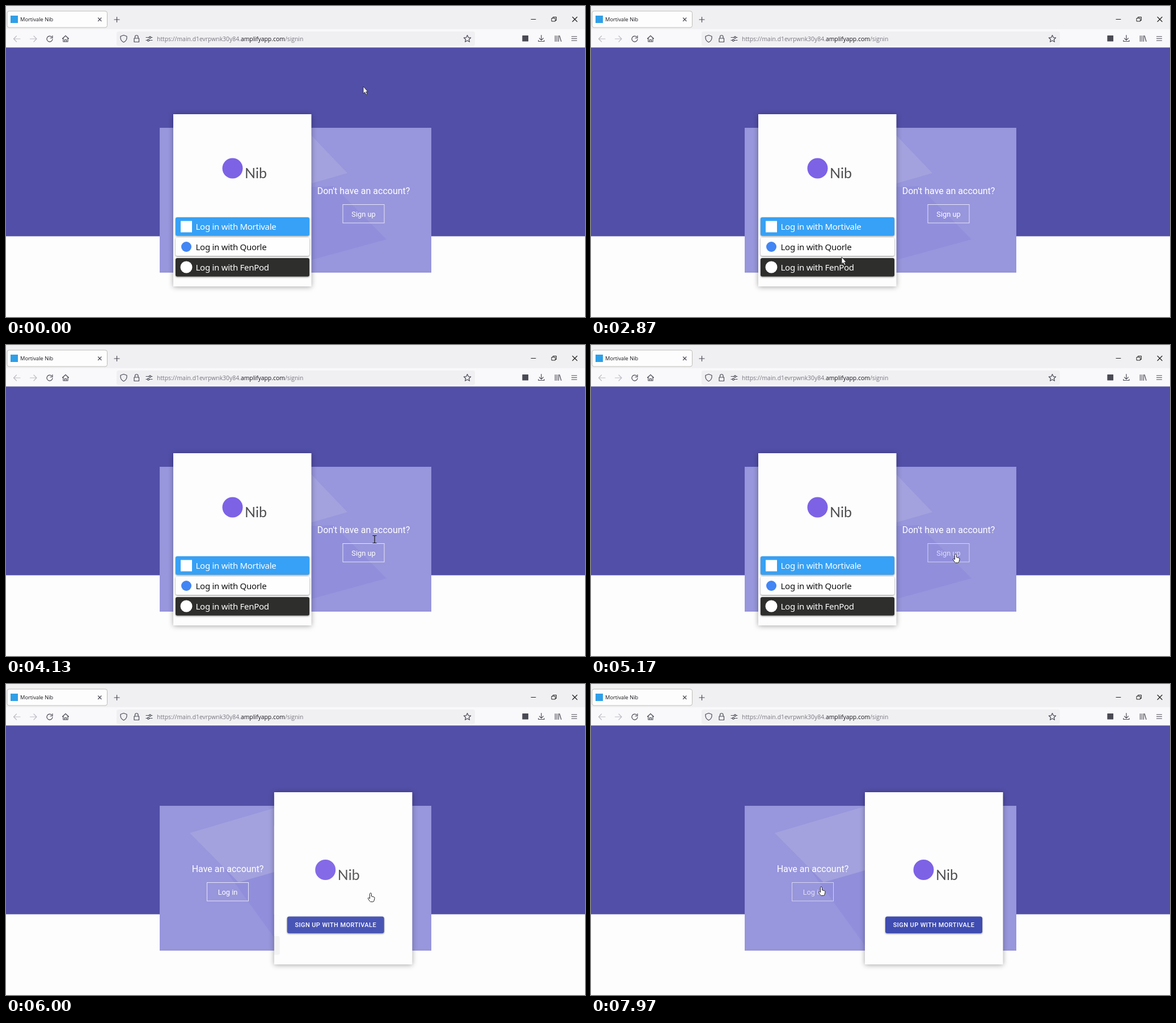
An HTML page for the animation above (8 s loop, 1021 by 549 pixels).

```html
<!DOCTYPE html>
<html lang="en">
<head>
<meta charset="utf-8">
<title>Sign in</title>
<style>
html, body { margin: 0; width: 100%; height: 100%; overflow: hidden; background: #fdfdfd; }
svg { display: block; width: 100vw; height: 100vh; }
.ui { font-family: "Open Sans", sans-serif; }
.heading { font: 16px Roboto, sans-serif; fill: #fff; text-anchor: middle; }
.outline text { font: 12.8px Roboto, sans-serif; fill: #fff; text-anchor: middle; }
.outline rect { fill: none; stroke: #e6e5f8; }
.outline.hover text { opacity: .7; }
.outline.hover rect { opacity: .8; }
.login text { font: 15px "Noto Sans", sans-serif; letter-spacing: -.28px; fill: #fff; }
.raised { filter: drop-shadow(0 1px 1.5px rgba(0, 0, 0, .45)); }
.icons { fill: none; stroke: #4a4a55; stroke-width: 1.2; stroke-linecap: round; stroke-linejoin: round; }
#sheet { filter: drop-shadow(0 1px 5px rgba(0, 0, 0, .35)); }
</style>
</head>
<body>
<svg viewBox="0 0 1021 549" xmlns="http://www.w3.org/2000/svg">
  <defs>
    <clipPath id="panelClip"><rect x="271" y="215" width="479" height="255.5"/></clipPath>
    <clipPath id="cardClip"><rect y="191" width="243.5" height="304"/></clipPath>
    <g id="logo">
      <circle cx="104.5" cy="286.5" r="18" fill="#7d62e6"/>
      <text x="126" y="304" font-family="Lato, sans-serif" font-size="25" fill="#4d4d50">Nib</text>
    </g>
  </defs>

  <!-- page -->
  <rect width="1021" height="549" fill="#fdfdfd"/>
  <rect y="73" width="1021" height="333.5" fill="#524fa8"/>
  <g clip-path="url(#panelClip)">
    <rect x="271" y="215" width="479" height="256" fill="#9896dc"/>
    <path d="M385 326L484 463L671 412L578 318Z" fill="#918fdb"/>
    <path d="M324 263L517 206L602 295L410 350Z" fill="#a3a2de"/>
    <path d="M271 470H750" stroke="#8583c4"/>
  </g>
  <text class="heading" x="391" y="332">Have an account?</text>
  <text class="heading" x="630.5" y="332">Don't have an account?</text>
  <g class="outline" id="toLogin"><rect x="354.5" y="350.5" width="73" height="32.5"/><text x="391" y="371.5">Log in</text></g>
  <g class="outline" id="toSignup"><rect x="594" y="350.5" width="73" height="32.5"/><text x="630.5" y="371.5">Sign up</text></g>

  <!-- sliding card -->
  <g id="card">
    <rect id="sheet" y="191" width="243.5" height="304" fill="#fdfdfd"/>
    <g clip-path="url(#cardClip)">
      <g id="login" class="login">
        <use href="#logo"/>
        <rect class="raised" x="4" y="373" width="236" height="32.5" rx="3" fill="#36a1f6"/>
        <rect class="raised" x="4" y="409" width="236" height="32" rx="3" fill="#fefefe"/>
        <rect class="raised" x="4" y="445" width="236" height="32.5" rx="3" fill="#2e2e2d"/>
        <rect x="13" y="379.5" width="20" height="20" fill="#fff"/>
        <circle cx="23" cy="425" r="9" fill="#4285f4"/>
        <circle cx="23" cy="461" r="10.5" fill="#fff"/>
        <text x="39.5" y="395">Log in with Mortivale</text>
        <text x="39.5" y="431" style="fill:#111">Log in with Quorle</text>
        <text x="39.5" y="467">Log in with FenPod</text>
      </g>
      <g id="signup">
        <rect x="9" y="250" width="225" height="157" fill="#fdfdfd"/>
        <use href="#logo" x="-1" y="41.5"/>
        <rect class="raised" x="36" y="410.5" width="171" height="29.5" rx="3.5" fill="#3f4cb1"/>
        <text x="121.5" y="429" text-anchor="middle" font-family="Roboto, sans-serif" font-weight="500" font-size="11" letter-spacing=".42" fill="#fff">SIGN UP WITH MORTIVALE</text>
      </g>
    </g>
  </g>

  <!-- browser window -->
  <rect width="1021" height="41" fill="#f0f0f2"/>
  <rect y="41" width="1021" height="32" fill="#f9f9fb"/>
  <path d="M0 73H1021" stroke="#d2d2da" stroke-width=".8"/>
  <rect x="2" y="9" width="176.5" height="29" rx="3.5" fill="#fdfdfd" stroke="#bdbdb8"/>
  <rect x="195" y="45" width="632" height="25.5" rx="3.5" fill="#f0f0f3"/>
  <rect x="8" y="17" width="13" height="13" fill="#2f9fe8"/>
  <g class="ui">
    <text x="25" y="27" font-size="9.3" fill="#15141a">Mortivale Nib</text>
    <text x="266" y="61.8" font-size="10.4" fill="#77777f">https://main.d1evrpwnk30y84.<tspan fill="#15141a">amplifyapp.com</tspan>/signin</text>
  </g>
  <g class="icons">
    <path stroke="#bcbcc3" d="M25 58H13.5M18.5 53L13.5 58L18.5 63M42.500 58H54M49 53L54 58L49 63"/>
    <path d="M80.500 54.500A5 5 0 1 0 82 58.500M82 52.500V56.500H78"/>
    <path d="M99.500 57.500L105 52.500L110.500 57.500M101 56.500V63H109V56.500M103.500 63V59.500H106.500V63"/>
    <path d="M207.500 51.500L213 53.500V57Q212.500 61.500 207.500 64Q202.500 61.500 202 57V53.500Z"/>
    <path d="M226 57H234.500V63.500H226ZM227.500 57V54.500A2.700 2.700 0 0 1 233 54.500V57"/>
    <path d="M247 55.500H252M256 55.500H258M247 60.500H249M253 60.500H258"/>
    <circle cx="254" cy="55.500" r="1.600"/><circle cx="251" cy="60.500" r="1.600"/>
    <path d="M813.500 51.500L815.300 55.600L819.700 56L816.400 59L817.400 63.300L813.500 61L809.600 63.300L810.600 59L807.300 56L811.700 55.600Z"/>
    <rect x="911" y="52.500" width="9.500" height="9.500" fill="#4a4a55"/>
    <path d="M944 51.500V60M940.500 56.800L944 60.300L947.500 56.800M939 60.500V62.500H949V60.500"/>
    <path d="M968.500 52.500V62.500M971.500 52.500V62.500M974.500 52.500V62.500M976 52.500L979 62.500"/>
    <path d="M997.500 54H1006.500M997.500 57.500H1006.500M997.500 61H1006.500"/>
    <path d="M191 24H200M195.500 19.500V28.500M162.500 21L168 26.500M168 21L162.500 26.500"/>
    <g stroke="#222">
      <path stroke-width="1" d="M926 23.500H934M962.500 21.500H968.500V27H962.500ZM964.500 21V19.500H970.500V25.500H969"/>
      <path d="M999 19.500L1007 27.500M1007 19.500L999 27.500"/>
    </g>
  </g>

  <!-- pointer -->
  <g id="cursor" stroke-linejoin="round">
    <path id="arrow" d="M0 0V12.500L2.700 10L4.900 14.500L6.900 13.500L4.800 9.300H8.200Z" fill="#fff" stroke="#222" stroke-width=".9"/>
    <path id="beam" d="M-3.500 -6.500H-1Q0 -6.500 0 -5.500Q0 -6.500 1 -6.500H3.500M0 -5.500V5.500M-3.500 6.500H-1Q0 6.500 0 5.500Q0 6.500 1 6.500H3.500" fill="none" stroke="#161616" stroke-width="1.2"/>
    <path id="hand" d="M-1.500 1.500A1.500 1.500 0 0 1 1.500 1.500V5.800L5.500 6.800Q7.400 7.300 7 9.300L6 13.500Q5.500 15.500 3.700 15.500H.3Q-.8 15.500 -1.500 14.500L-4.600 9.800Q-5 8.200 -3.300 8.300L-1.500 9.800Z" fill="#fff" stroke="#222" stroke-width="1"/>
  </g>
</svg>
<script>
const LOOP = 8000;
const el = id => document.getElementById(id);
const ease = (t, a, b) => {
  const x = Math.min(1, Math.max(0, (t - a) / (b - a)));
  return x * x * (3 - 2 * x);
};

// Pointer moves: start, end, x, y
const home = [630, 142];
const moves = [
  [200, 1250, 442, 443],
  [3050, 4080, 650, 343],
  [4300, 4900, 643, 369],
  [6700, 7750, 406, 358]
];

function pointer(t) {
  let [x, y] = home;
  for (const [a, b, toX, toY] of moves) {
    const k = ease(t, a, b);
    x += (toX - x) * k;
    y += (toY - y) * k;
  }
  return [x, y];
}

function draw(now) {
  const t = now % LOOP;
  const p = ease(t, 5580, 6070);
  const width = 243.5;

  el("card").setAttribute("transform", `translate(${295 + 188 * p})`);
  el("login").setAttribute("transform", `translate(${-width * p})`);
  el("login").setAttribute("opacity", 1 - p);
  el("signup").setAttribute("transform", `translate(${width * (p - 1)})`);
  el("signup").setAttribute("opacity", p);

  const [x, y] = pointer(t);
  const over = (left, top, w, h) => x >= left && x <= left + w && y >= top && y <= top + h;
  const onSignup = t < 6700 && over(594, 350, 73, 33);
  const onLogin = p === 1 && over(354, 350, 73, 33);
  const onProvider = p === 0 && [373, 409, 445].some(top => over(299, top, 236, 32));
  const onText = p === 0 && over(549, 312, 163, 38);
  const kind = onSignup || onLogin || onProvider ? "hand" : onText ? "beam" : "arrow";

  el("toSignup").classList.toggle("hover", onSignup);
  el("toLogin").classList.toggle("hover", onLogin);
  el("cursor").setAttribute("transform", `translate(${x} ${y})`);
  for (const id of ["arrow", "beam", "hand"]) el(id).style.display = id === kind ? "" : "none";
}

function tick() {
  draw(performance.now());
  requestAnimationFrame(tick);
}
tick();
</script>
</body>
</html>
```
